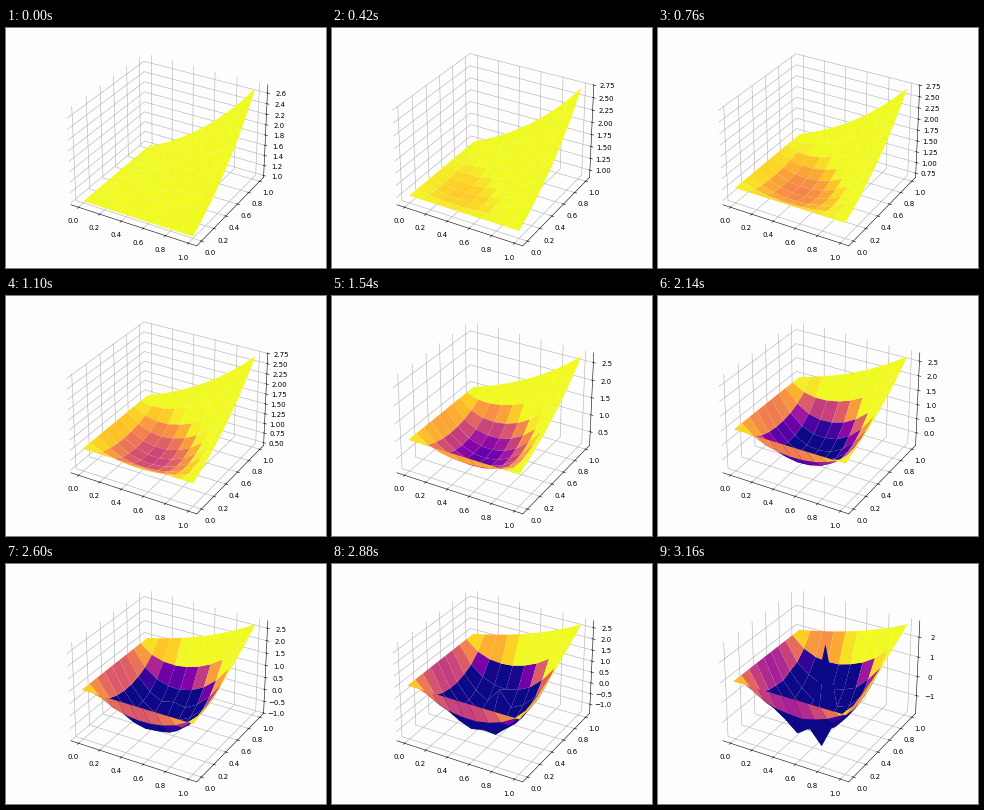
A matplotlib script for the animation above (3180 ms loop, 320 px wide and 240 px high).

```python
import numpy as np
import matplotlib.pyplot as plt
from matplotlib.animation import FuncAnimation

FRAMES, STEP = 159, 20
LAST = FRAMES - 1
POINTS = 10
BACK = "#fdfdfd"

x = np.linspace(0, 1, POINTS)
X, Y = np.meshgrid(x, x)
start = np.exp(X * Y)


def load(a, b):
    """Deflection of an evenly loaded membrane on the unit square."""
    odd = range(1, 40, 2)
    return sum(np.sin(m * np.pi * a) * np.sin(n * np.pi * b)
               / (m * n * (m * m + n * n)) for m in odd for n in odd)


sag = load(X, Y) / load(0.5, 0.5)

# Late breakdown of the mesh: faint noise plus one peak and two dips.
rng = np.random.default_rng(4)
ripple = 0.1 * rng.uniform(-1, 1, X.shape) * sag
for col, row, rise in [(4, 6, 3.2), (6, 2, -0.92), (4, 2, -0.42)]:
    ripple[row, col] += rise


def height(k):
    s = k / LAST
    depth = 2.13 * s + 0.97 * s**4
    return start - depth * sag + np.exp((k - LAST) / 10) * ripple


def padded(lo, hi):
    edge = (hi - lo) / 48
    return lo - edge, hi + edge


fig = plt.figure(figsize=(6.4, 4.8), dpi=50, facecolor=BACK)
ax = fig.add_axes((0, 1 / 30, 1, 28 / 30), projection="3d", facecolor="none")
for axis in (ax.xaxis, ax.yaxis, ax.zaxis):
    axis.set_pane_color((1, 1, 1, 0))
ax.set_xlim(*padded(-0.05, 1.05))
ax.set_ylim(*padded(-0.05, 1.05))

surface = None


def draw(k):
    global surface
    if surface is not None:
        surface.remove()
    z = height(k)
    surface = ax.plot_surface(X, Y, z, rstride=1, cstride=1, cmap="plasma",
                              vmin=0, vmax=1, linewidth=0)
    ax.set_zlim(*padded(z.min(), z.max()))
    return [surface]


anim = FuncAnimation(fig, draw, frames=FRAMES, init_func=lambda: [],
                     interval=STEP, repeat=True, repeat_delay=0, blit=False)
plt.show()
```
